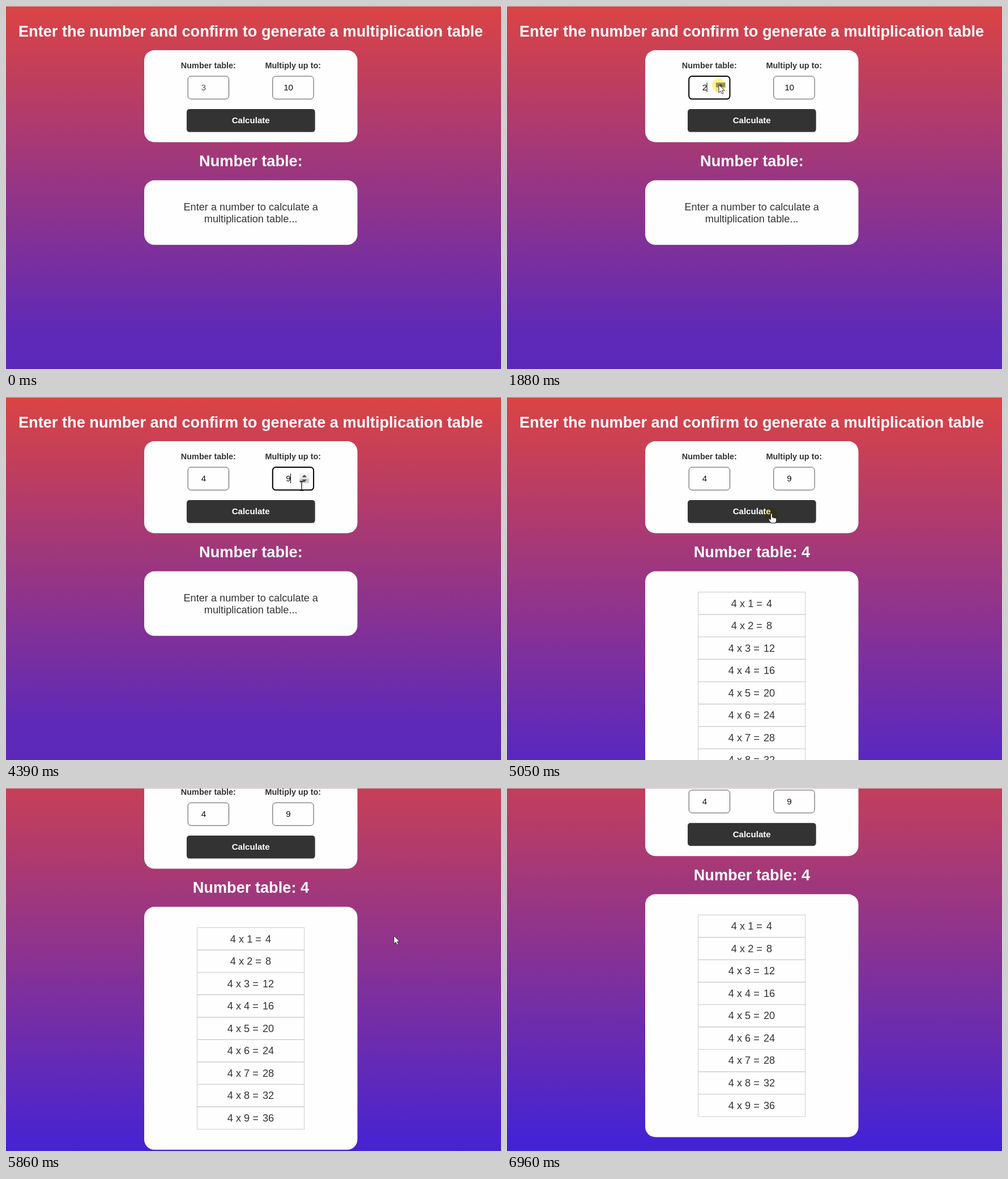
These frames come from a looping animation (874 px wide and 641 px high, 7230 ms). An HTML page:

```html
<!DOCTYPE html>
<html lang="en">
<head>
<meta charset="utf-8">
<title>Multiplication table</title>
<style>
  html, body { margin: 0; width: 100%; height: 100%; overflow: hidden; background: #5c28ba; }
  svg { display: block; width: 874px; height: 641px; font-family: "Liberation Sans", Arial, sans-serif; }
  text { text-anchor: middle; fill: #333; }
  .heading { font-weight: bold; font-size: 27.2px; fill: #fff; }
  .label { font-weight: bold; font-size: 14.45px; }
  .value { font-size: 15.2px; fill: #111; }
  .value.placeholder { fill: #5f4669; }
  .button { font-weight: bold; font-size: 15.1px; fill: #fff; }
  .result { font-size: 18.2px; }
  .card, .field { fill: #fefefe; }
  .grid { fill: none; stroke: #ccc; }
  #glow { fill: #fff04a; opacity: .65; mix-blend-mode: multiply; }
</style>
</head>
<body>
<svg viewBox="0 0 874 641">
  <defs>
    <linearGradient id="shortPage" gradientUnits="userSpaceOnUse" x1="0" y1="0" x2="0" y2="641">
      <stop offset="0" stop-color="#db4444"/>
      <stop offset=".9" stop-color="#5e29b8"/>
      <stop offset="1" stop-color="#5c28ba"/>
    </linearGradient>
    <linearGradient id="longPage" gradientUnits="userSpaceOnUse" x1="0" y1="0" x2="0" y2="762">
      <stop offset="0" stop-color="#db4444"/>
      <stop offset="1" stop-color="#4022d8"/>
    </linearGradient>
  </defs>
  <g id="page">
    <rect id="backdrop" width="874" height="770"/>
    <text class="heading" x="432.1" y="53.6">Enter the number and confirm to generate a multiplication table</text>
    <rect class="card" x="244" y="78" width="376.5" height="162.5" rx="18.2"/>
    <text class="label" x="357.4" y="109.7">Number table:</text>
    <text class="label" x="506.8" y="109.7">Multiply up to:</text>
    <g id="fields"></g>
    <rect x="319" y="182" width="226.7" height="40.6" rx="5" fill="#333"/>
    <text class="button" x="432.2" y="207.3">Calculate</text>
    <text id="heading" class="heading" x="432.4" y="283.2"></text>
    <rect id="resultCard" class="card" x="244" y="307.8" width="376.5" rx="18.2"/>
    <g id="hint" class="result">
      <text x="432.2" y="361">Enter a number to calculate a</text>
      <text x="432.2" y="381.8">multiplication table...</text>
    </g>
    <g id="table" class="result"></g>
  </g>
  <rect width="874" height="1" fill="#cbb9c2"/>
  <circle id="glow" r="12"/>
  <g id="cursor">
    <path id="arrow" d="M0 0V14.2L3.3 11.2L5.5 16.2L7.8 15.2L5.6 10.2H10Z" fill="#fff" stroke="#222" stroke-width=".9"/>
    <path id="beam" d="M-3.5 -8H3.5M0 -8V8M-3.5 8H3.5" fill="none" stroke="#111" stroke-width="1.3"/>
    <path id="hand" d="M-1.5 0Q0 -2 1.5 0V6L9 7.5V12L7 16H-1L-5 10Q-5 8 -3.5 8.5L-1.5 10Z" fill="#fff" stroke="#111"/>
  </g>
</svg>
<script>
const LOOP = 7230;
const PRESS = 110;
const BLINK = 500;
const FIELD = { y: 124, width: 72.3, height: 40.3, middle: 143.8 };

// Clicks raise the first number, lower the second, then submit.
const raiseClicks = [790, 1810, 2080, 2420];
const lowerClick = 3920;
const submitClick = 4980;
const clicks = [...raiseClicks, lowerClick, submitClick];

// Each pointer move: begin and end time, destination.
const entry = { x: 616, y: 527 };
const moves = [
  { from: 130, to: 660, x: 374, y: 139 },
  { from: 2690, to: 3520, x: 531, y: 143 },
  { from: 3920, to: 4390, x: 522, y: 157 },
  { from: 4460, to: 4650, x: 460, y: 205 },
  { from: 4980, to: 5650, x: 679, y: 255 },
  { from: 5720, to: 5860, x: 685, y: 261 },
  { from: 5920, to: 6960, x: 826, y: 641 }
];
const scrolling = { from: 5750, duration: 195, distance: 120.3 };

const $ = id => document.getElementById(id);
const show = (node, visible) => node.setAttribute('display', visible ? 'inline' : 'none');
const clamp = k => Math.min(1, Math.max(0, k));
const smooth = k => k * k * (3 - 2 * k);
const easeOut = k => 1 - (1 - k) ** 2;
const inside = (p, x, y, width, height) => p.x >= x && p.x <= x + width && p.y >= y && p.y <= y + height;

function add(parent, tag, attrs = {}, text = '') {
  const node = document.createElementNS('http://www.w3.org/2000/svg', tag);
  for (const key in attrs) node.setAttribute(key, attrs[key]);
  node.textContent = text;
  return parent.appendChild(node);
}

function makeField(x) {
  const { y, width, height, middle } = FIELD;
  const root = add($('fields'), 'g');
  const box = add(root, 'rect', { class: 'field', x, y, width, height, rx: 5.5 });
  const value = add(root, 'text', { class: 'value', x: x + 27.8, y: 149 });
  const caret = add(root, 'rect', { x: x + 31.3, y: 135.5, width: 1, height: 16.5 });
  const spinner = add(root, 'g');
  const halves = [middle - 8.5, middle].map(top =>
    add(spinner, 'rect', { x: x + 47.7, y: top, width: 16.6, height: 8.5 }));
  for (const side of [-1, 1]) {
    add(spinner, 'path', { d: `M${x + 51.6} ${middle + 2 * side}h8.8l-4.4 ${4.6 * side}z`, fill: '#505050' });
  }
  return { x, box, value, caret, spinner, halves };
}

function makeTable() {
  const left = 337.5, top = 344.5, width = 189.2, height = 39.55;
  for (let i = 1; i <= 9; i++) {
    const y = top + height * (i - 1);
    add($('table'), 'rect', { class: 'grid', x: left, y, width, height });
    const row = add($('table'), 'text', { x: 432, y: y + 26 }, `4 x ${i} = `);
    add(row, 'tspan', { dx: 2 }, 4 * i);
  }
}

function pointerAt(t) {
  return moves.reduce((p, move) => {
    const k = smooth(clamp((t - move.from) / (move.to - move.from)));
    return { x: p.x + (move.x - p.x) * k, y: p.y + (move.y - p.y) * k };
  }, entry);
}

// Returns whether the pointer is over the editable part.
function drawField(field, text, focused, caretOn, pointer, pressed) {
  const hovered = inside(pointer, field.x, FIELD.y, FIELD.width, FIELD.height);
  const overSpinner = hovered && pointer.x >= field.x + 47.7 && pointer.y < 160;
  const activeHalf = overSpinner ? Number(pointer.y > FIELD.middle) : -1;
  field.box.setAttribute('stroke', focused ? '#000' : '#4a4550');
  field.box.setAttribute('stroke-width', focused ? 2 : 0.95);
  field.value.textContent = text;
  show(field.caret, focused && caretOn);
  show(field.spinner, focused || hovered);
  field.halves.forEach((half, i) =>
    half.setAttribute('fill', i !== activeHalf ? '#efefef' : pressed ? '#999' : '#cfcfcf'));
  return hovered && !(overSpinner && pointer.y < 153);
}

const fields = [470.8 - 149.6, 470.8].map(makeField);
makeTable();

function draw(t) {
  const present = t >= moves[0].from && t < moves[moves.length - 1].to;
  const pointer = pointerAt(t);
  const lastClick = clicks.filter(click => click <= t).pop() ?? -LOOP;
  const pressed = t - lastClick < PRESS;
  const caretOn = (t - lastClick) % (2 * BLINK) < BLINK;
  const raised = raiseClicks.filter(click => click <= t).length;
  const done = t >= submitClick + PRESS / 2;
  const scroll = scrolling.distance * easeOut(clamp((t - scrolling.from) / scrolling.duration));
  const onPage = present ? { x: pointer.x, y: pointer.y + scroll } : { x: -99, y: -99 };

  const overText = [
    drawField(fields[0], raised || 3, raised > 0 && t < lowerClick, caretOn, onPage, pressed),
    drawField(fields[1], t < lowerClick ? 10 : 9, t >= lowerClick && t < submitClick, caretOn, onPage, pressed)
  ].includes(true);
  const overButton = inside(onPage, 319, 182, 226.7, 40.6);
  fields[0].value.classList.toggle('placeholder', !raised);

  $('page').setAttribute('transform', `translate(0 ${-scroll})`);
  $('backdrop').setAttribute('fill', `url(#${done ? 'longPage' : 'shortPage'})`);
  $('heading').textContent = done ? 'Number table: 4' : 'Number table:';
  $('resultCard').setAttribute('height', done ? 429 : 114);
  show($('hint'), !done);
  show($('table'), done);

  show($('cursor'), present);
  show($('beam'), overText);
  show($('hand'), overButton);
  show($('arrow'), !overText && !overButton);
  $('cursor').setAttribute('transform', `translate(${pointer.x} ${pointer.y})`);
  show($('glow'), pressed);
  $('glow').setAttribute('transform', `translate(${pointer.x} ${pointer.y + 1})`);
}

const start = performance.now();
function tick() {
  draw((performance.now() - start) % LOOP);
  requestAnimationFrame(tick);
}
tick();
</script>
</body>
</html>
```
